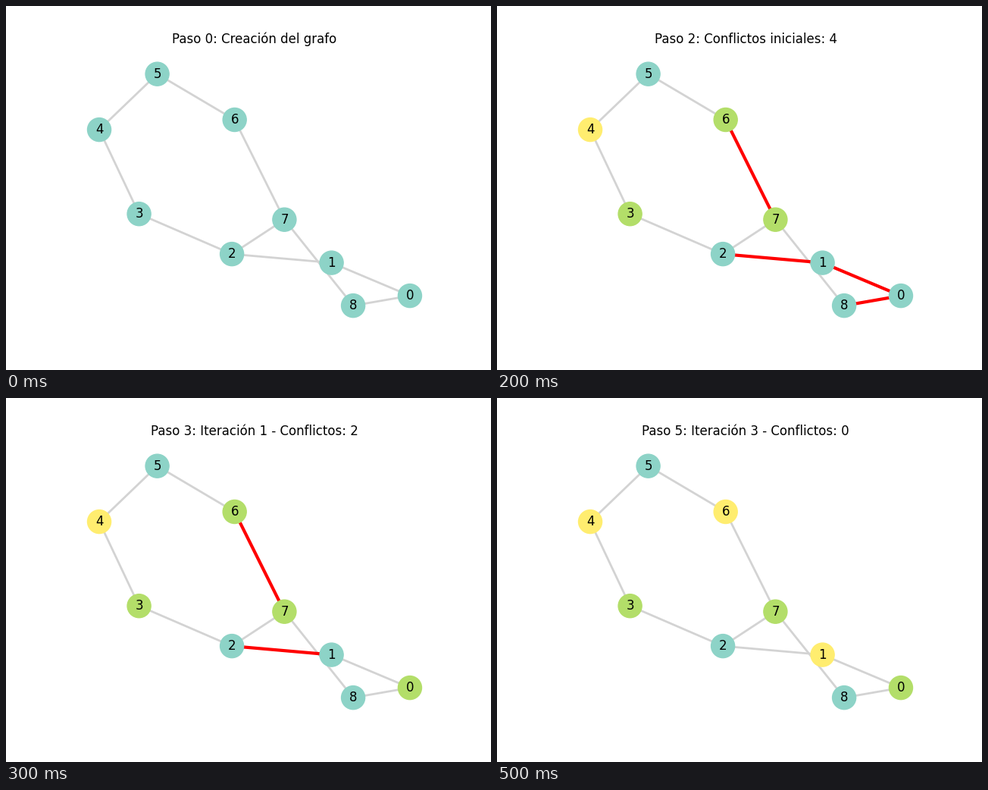
A matplotlib script for the animation above (0.6 s loop, 640x480 px).

```python
import matplotlib.pyplot as plt
from matplotlib.animation import FuncAnimation
from matplotlib.collections import LineCollection

plt.rcParams["font.family"] = "DejaVu Sans"

TEAL, GREEN, YELLOW = "#8dd3c7", "#b3de69", "#ffed6f"
NODES = [(532.96, 382.1), (429.6, 338.6), (298.1, 327.1), (175.6, 274.2),
         (123.04, 163.1), (199.6, 89.67), (301.7, 150.0), (367.4, 281.7),
         (458.1, 395.12)]
EDGES = [(i, i + 1) for i in range(8)] + [(8, 0), (2, 7)]

START = [TEAL, TEAL, TEAL, GREEN, YELLOW, TEAL, GREEN, GREEN, TEAL]
REPAIRS = [(0, GREEN), (1, YELLOW), (6, YELLOW)]


def segments(edges):
    return [(NODES[a], NODES[b]) for a, b in edges]


def state(step):
    """Return the node colours, conflicting edges and title of a step."""
    if step == 0:
        return [TEAL] * len(NODES), [], "Creación del grafo"
    colors = list(START)
    for node, color in REPAIRS[:max(0, step - 2)]:
        colors[node] = color
    conflicts = [(a, b) for a, b in EDGES if colors[a] == colors[b]]
    if step == 1:
        text = "Asignación aleatoria de colores"
    elif step == 2:
        text = f"Conflictos iniciales: {len(conflicts)}"
    else:
        text = f"Iteración {step - 2} - Conflictos: {len(conflicts)}"
    return colors, conflicts, text


fig, ax = plt.subplots(figsize=(6.4, 4.8), dpi=100)
# Default axes area, with data units equal to stage pixels
ax.set(xlim=(80, 576), ylim=(427.2, 57.6))
ax.axis("off")
title = ax.set_title("", fontsize=12)

ax.add_collection(LineCollection(segments(EDGES), colors="lightgray",
                                 linewidths=2, zorder=1), autolim=False)
clashes = LineCollection([], colors="red", linewidths=3, zorder=1.5)
ax.add_collection(clashes, autolim=False)
dots = ax.scatter(*zip(*NODES), s=500, c=START, zorder=2)
for label, (x, y) in enumerate(NODES):
    ax.text(x, y, str(label), fontsize=12, ha="center", va="center", zorder=3)


def update(step):
    colors, conflicts, text = state(step)
    dots.set_facecolor(colors)
    dots.set_edgecolor(colors)
    clashes.set_segments(segments(conflicts))
    title.set_text(f"Paso {step}: {text}")
    return dots, clashes, title


anim = FuncAnimation(fig, update, frames=6, interval=100, repeat=True,
                     repeat_delay=0)
plt.show()
```
